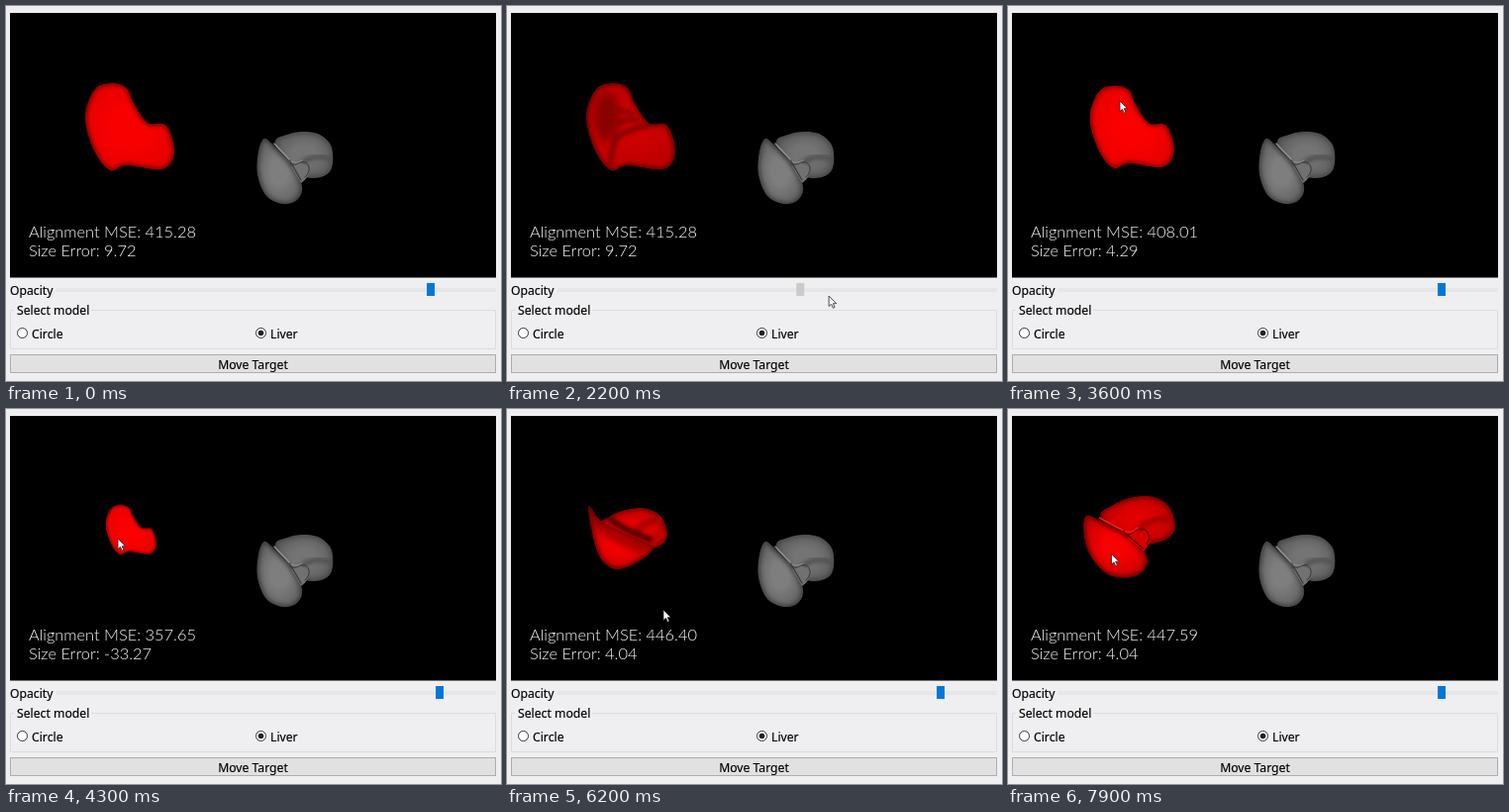
Animation, 500 px wide and 379 px high, one loop 8 s. Source, as an HTML page:

```html
<!DOCTYPE html>
<html lang="en">
<head>
<meta charset="utf-8">
<title>Liver alignment</title>
<style>
html, body { margin: 0; width: 100%; height: 100%; overflow: hidden; background: #efeef0; }
svg { display: block; width: 500px; height: 379px; }
text { font: 12.2px "Noto Sans", "Open Sans", sans-serif; fill: #000; stroke: #000; stroke-width: .15px; }
.readout text { font: 300 16.4px Lato, sans-serif; fill: #fff; stroke: none; }
.line { fill: none; stroke-linecap: round; stroke-linejoin: round; }
#button rect { fill: #e1e1e1; stroke: #adadad; }
#button.hot rect { fill: #e5f1fb; stroke: #0078d7; }
</style>
</head>
<body>
<svg viewBox="0 0 500 379">
  <defs id="defs">
    <filter id="soft" x="-30%" y="-30%" width="160%" height="160%"><feGaussianBlur stdDeviation="2"/></filter>
    <filter id="wide" x="-60%" y="-60%" width="220%" height="220%"><feGaussianBlur stdDeviation="4"/></filter>
  </defs>

  <rect x="4" y="7" width="491" height="267.5"/>
  <g id="gray"></g>
  <g id="red">
    <g id="front"></g>
    <g id="body"></g>
  </g>

  <g class="readout">
    <text x="23" y="234" id="mse"></text>
    <text x="23" y="252.5" id="size"></text>
  </g>

  <text x="4" y="291.5">Opacity</text>
  <rect x="51" y="285" width="444" height="4" fill="#e6e6e7"/>
  <rect id="handle" y="280" width="8" height="13"/>

  <path d="M8 307.5H4.5V346.5H494.5V307.5H86" fill="none" stroke="#dcdcdc"/>
  <text x="11" y="311.5">Select model</text>
  <g fill="#fff" stroke="#333">
    <circle cx="16.5" cy="330.5" r="5"/>
    <circle cx="257.5" cy="330.5" r="5"/>
  </g>
  <circle cx="257.5" cy="330.5" r="2.8" fill="#222"/>
  <text x="26" y="335.5">Circle</text>
  <text x="267" y="335.5">Liver</text>
  <g id="button">
    <rect x="4.5" y="352.5" width="490" height="18"/>
    <text x="249.500" y="367" text-anchor="middle">Move Target</text>
  </g>

  <path id="cursor" d="M0 0V10.5L2.5 8.3L4.2 12.2L5.9 11.4L4.2 7.7H7.5Z" fill="#fff" stroke="#222" stroke-width=".8"/>
</svg>
<script>
const $ = id => document.getElementById(id);
const clamp = v => Math.max(0, Math.min(1, v));
const ease = k => k * k * (3 - 2 * k);
const ramp = (t, from, to) => clamp((t - from) / (to - from));
const mix = (a, b, k) => a.map((v, i) => v + (b[i] - v) * k);

// Key points of the outlines.
const BODY = [[108, 78], [90, 84], [80, 112], [89, 146], [105, 166], [122, 161],
  [158, 165], [170, 148], [162, 121], [143, 118], [129, 98], [122, 83]];
const LEFT = [[261, 134], [255, 147], [254, 170], [263, 192], [280, 200], [294, 196],
  [299, 182], [288, 160], [271, 142]];
const RIGHT = [[272, 138], [284, 130], [300, 127], [317, 130], [329, 143], [328, 166],
  [311, 174], [286, 166]];
const LEFT_LOW = [[83, 98], [84, 115], [91, 144], [100, 157], [113, 162], [133, 154],
  [147, 140], [122, 127], [95, 113]];

// Front view, carried from the gray model to the red one.
const TURN = -15 * Math.PI / 180;
const toRed = ([x, y]) => {
  const u = x - 292, v = y - 163;
  return [125 + 1.22 * (u * Math.cos(TURN) - v * Math.sin(TURN)),
    129 + 1.06 * (u * Math.sin(TURN) + v * Math.cos(TURN))];
};
const RED_VIEW = 'translate(125 129) scale(1.22 1.06) rotate(-15) translate(-292 -163)';
const leftUp = LEFT.map(toRed), rightUp = RIGHT.map(toRed);
const rightLow = rightUp.map(([x, y]) => [103 + (x - 104) * .91, 101 + (y - 89) * .88]);

// Tilting back crowds the rows towards the lower edge.
const tilt = ([x, y], k) => {
  const u = Math.max(0, (y - 78) / 88);
  return [x + k, y + k * (87 + 76 * u ** .73 - y)];
};

// Keys are [time, ...values].
function track(t, keys, shape = ease) {
  const n = keys.findIndex(k => k[0] > t);
  if (n === 0) return keys[0].slice(1);
  if (n < 0) return keys[keys.length - 1].slice(1);
  const [a, b] = [keys[n - 1], keys[n]];
  return mix(a, b, shape(ramp(t, a[0], b[0]))).slice(1);
}

// Closed Catmull-Rom curve.
function curve(p) {
  const at = i => p[(i + p.length) % p.length];
  const parts = p.map((b, i) => {
    const [a, c, e] = [at(i - 1), at(i + 1), at(i + 2)];
    return `C${b.map((v, q) => v + (c[q] - a[q]) / 6)} ${c.map((v, q) => v - (e[q] - b[q]) / 6)} ${c}`;
  });
  return `M${p[0]}${parts.join('')}Z`;
}

function add(parent, tag, attrs) {
  const el = document.createElementNS('http://www.w3.org/2000/svg', tag);
  for (const k in attrs) el.setAttribute(k, attrs[k]);
  return parent.appendChild(el);
}

// Lit shape with a soft dark rim; `inner` is drawn inside its outline.
let count = 0;
function lobe(parent, [light, dark, rim], inner = '') {
  const id = 'lobe' + count++, ref = '#' + id;
  const path = add($('defs'), 'path', { id });
  add(add($('defs'), 'clipPath', { id: id + 'clip' }), 'use', { href: ref });
  const paint = add($('defs'), 'radialGradient', { id: id + 'paint', cx: .5, cy: .5, r: .65 });
  [[.3, light], [1, dark]].forEach(([offset, color]) => add(paint, 'stop', { offset, 'stop-color': color }));
  const g = add(parent, 'g', { 'clip-path': `url(#${id}clip)` });
  add(g, 'use', { href: ref, fill: `url(#${id}paint)` });
  add(g, 'use', { href: ref, fill: 'none', stroke: rim, 'stroke-width': 4, filter: 'url(#soft)' });
  const marks = add(g, 'g', { class: 'line' });
  marks.innerHTML = inner;
  return { marks, shape: pts => path.setAttribute('d', curve(pts)) };
}

// Vessels between the lobes, in front-view coordinates.
function vessels(parent, [light, mid, dark], transform = '') {
  const g = add(parent, 'g', { class: 'line', transform });
  g.innerHTML = `
    <path d="M288 162Q299 155 306 165Q306 174 298 179Z" fill="${mid}"/>
    <path d="M268 139L287 157L298 176" stroke="${dark}" stroke-width="1.3"/>
    <path d="M271 139L286 155" stroke="${light}" stroke-width="1.4"/>
    <path d="M287 159Q292 162 297 158Q304 156 306 163Q307 168 302 173" stroke="${dark}"/>
    <path d="M288 157Q293 160 299 156" stroke="${light}"/>`;
  return g;
}

const fold = color => `<path d="M298 160Q310 148 328 155" stroke="${color}" stroke-width="5" filter="url(#soft)"/>`;

lobe($('gray'), ['#747474', '#565656', '#444'], fold('#505050')).shape(RIGHT);
lobe($('gray'), ['#7e7e7e', '#5a5a5a', '#383838']).shape(LEFT);
vessels($('gray'), ['#929292', '#717171', '#383838']);

const back = lobe($('front'), ['#e40000', '#b00000', '#700000'],
  `<g transform="${RED_VIEW}">${fold('#a00000')}</g>`);
const shadow = add($('front'), 'path', { class: 'line', d: 'M105 112Q121 124 145 132',
  stroke: '#300000', 'stroke-width': 5, filter: 'url(#soft)' });
const fore = lobe($('front'), ['#fa0000', '#c00000', '#580000'],
  '<path d="M87 108Q97 128 138 140" stroke="#700000" stroke-width="6" filter="url(#wide)"/>');
const redVessels = vessels($('front'), ['#ff2020', '#d80000', '#600000'], RED_VIEW);

const body = lobe($('body'), ['#f00', '#e80000', '#700000'], `
  <ellipse cx="101" cy="112" rx="13" ry="25" fill="#600000" opacity=".5" filter="url(#wide)"/>
  <path d="M105 160Q104 143 113 131Q124 124 143 121" stroke="#700000" stroke-width="3" filter="url(#soft)"/>
  <path d="M113 106L127 109M111 119Q122 113 133 116" stroke="#800000" stroke-width="3" filter="url(#soft)"/>`);

const handleX = t => track(t, [[1500, 429], [1900, 85], [2430, 438]])[0];

// While dragging, the pointer runs a little ahead of the handle.
function pointer(t) {
  if (t < 1500) return track(t, [[0, 444, 395], [400, 429, 285]], k => k);
  if (t < 2500) return [handleX(t + 30), 285 + 8 * ramp(t, 1500, 1700)];
  return track(t, [[2500, 438, 293], [3000, 280, 231], [3400, 113, 86], [4300, 113, 131],
    [4900, 115, 70], [5400, 116, 161], [6200, 158, 203], [7800, 104.5, 146.5]], k => k);
}

function handleColor(t) {
  if (t >= 1200 && t < 2500) return '#cbcbcb';
  return t >= 400 && t < 2700 ? '#171717' : '#0078d7';
}

const squash = k => `translate(0 ${128 * (1 - k)}) scale(1 ${k})`;

function draw(t) {
  const h = handleX(t);
  const [x, y] = pointer(t);
  const [s] = track(t, [[3400, 1], [4300, .5701], [4900, .9432]]);
  const opacity = clamp((h - 51) / 444);
  const lean = ramp(t, 5100, 5400);
  const flip = ramp(t, 5550, 5850);
  const swing = ease(ramp(t, 6200, 7800));

  // The tilted outline already has the final scale.
  const k = s + (1 - s) * lean;
  body.shape(BODY.map(p => tilt(p, lean)));
  body.marks.style.opacity = clamp((.84 - opacity) * 3.4);
  $('body').setAttribute('transform',
    `translate(${128 * (1 - k)} ${122 * (1 - k)}) scale(${k}) ${squash(1 - .25 * ramp(t, 5400, 5850))}`);
  $('body').style.opacity = 1 - flip;

  fore.shape(LEFT_LOW.map((p, i) => mix(p, leftUp[i], swing)));
  back.shape(rightLow.map((p, i) => mix(p, rightUp[i], swing)));
  fore.marks.style.opacity = shadow.style.opacity = 1 - swing;
  redVessels.style.opacity = clamp(swing * 2 - 1);
  $('front').setAttribute('transform', squash(.82 + .18 * ramp(t, 5550, 6100)));
  $('front').style.opacity = flip;

  // Light passes through a near and a far wall.
  $('red').style.opacity = 1 - (1 - opacity) ** 2;

  const mse = t < 5100 ? 415.28 - 134.06 * (1 - s)
    : track(t, [[5100, 407.66], [5400, 407.52], [6200, 446.4], [7800, 447.59]])[0];
  $('mse').textContent = `Alignment MSE: ${mse.toFixed(2)}`;
  $('size').textContent = `Size Error: ${(9.72 - 100 * (1 - s)).toFixed(2)}`;

  $('handle').setAttribute('x', h - 4);
  $('handle').setAttribute('fill', handleColor(t));
  $('button').classList.toggle('hot', y > 352 && y < 371);
  $('cursor').setAttribute('transform', `translate(${x} ${y})`);
}

const start = performance.now();
function tick(now) {
  const t = Math.max(0, now - start) % 8000;
  draw(Math.floor(t / 100) * 100);
  requestAnimationFrame(tick);
}
draw(0);
requestAnimationFrame(tick);
</script>
</body>
</html>
```
